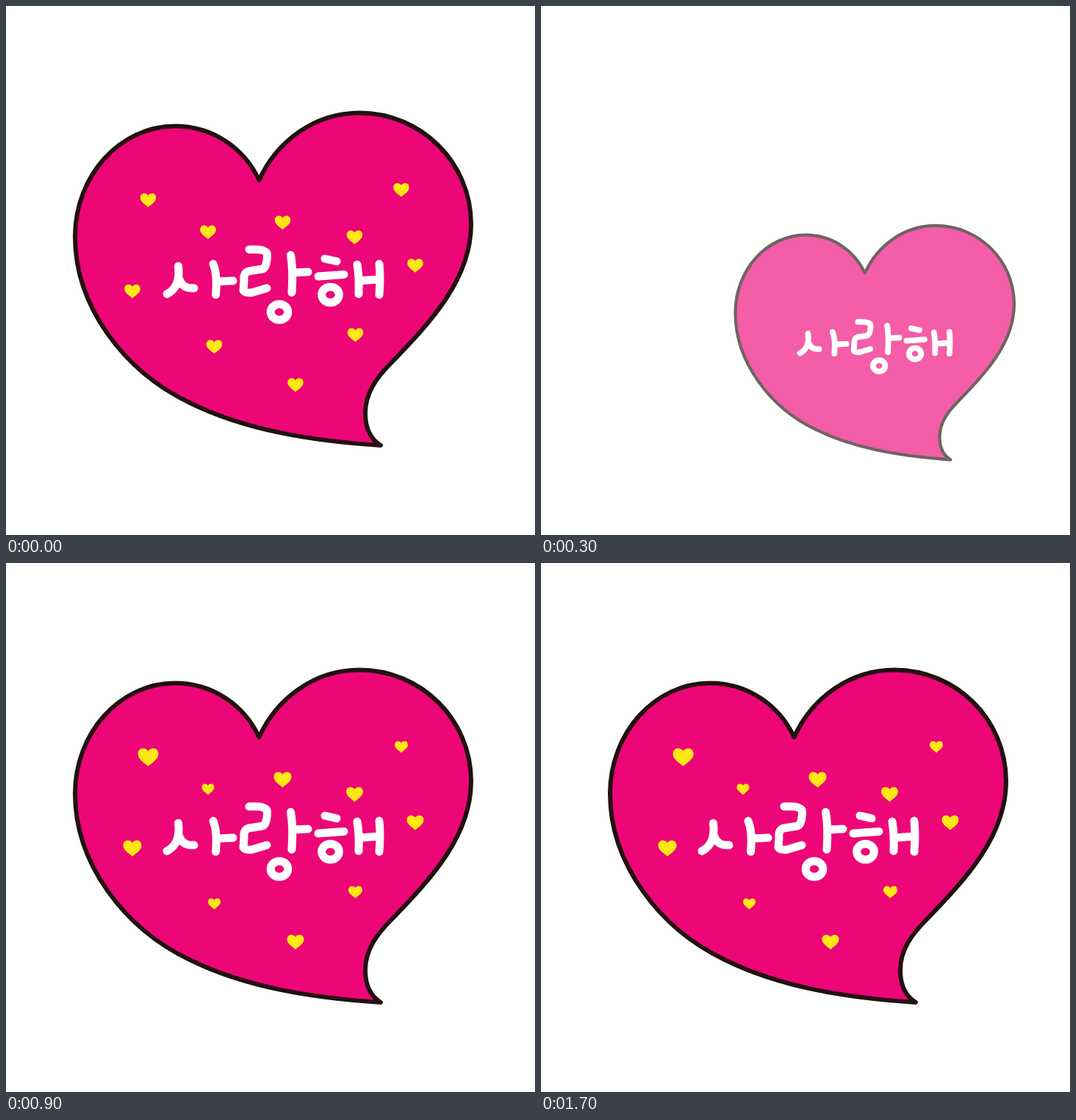
Animation, 720 px wide and 720 px high, one loop 1800 ms. Source, as an HTML page with a canvas:

```html
<!DOCTYPE html>
<html lang="ko">
<head>
<meta charset="utf-8">
<title>사랑해</title>
<style>
  html, body { margin: 0; width: 100%; height: 100%; overflow: hidden; background: #fff; }
  canvas { display: block; width: 720px; height: 720px; }
</style>
</head>
<body>
<canvas id="stage" width="720" height="720" role="img" aria-label="사랑해"></canvas>
<script>
const ctx = document.getElementById('stage').getContext('2d');
const LOOP = 1800, STEP = 100;
const PINK = '#ed0677', INK = '#231010', YELLOW = '#ffe714';
const ANCHOR = { x: 670, y: 664 };

const balloon = new Path2D(`M344.5 237
  C369 183 421 145.5 481 145.5 C565 145.5 633 213 633 297
  C633 372 578 430 525 485 C504 506 489 527 489 554
  C489 575 497 590 510 598 C415 592 325 577 250 540
  C160 497 94 408 94 314 C94 231 155 163.5 230 163.5
  C281 163.5 324 193 344.5 237 Z`);

const lettering = new Path2D(`
  M234.5 354 C237 374 231 386 219 392 M236 372 Q240 385 256 384
  M282 351 Q288 366 285.5 393 M288 375 L309 374
  M331 331.5 Q357 330 355.5 340 Q355 356 349 358 L330 361
  Q323 363 324 374 L323 387 Q325 391 335 390 L355 384
  M387.5 339 Q391 358 389 390 M390 363 L411 362
  M434 344 L450 347.5 M425 368 L460 365.5
  M478 352 Q481 370 480 392 M508 351 Q510 370 508 393 M481 374 L508 372`);
for (const [x, y] of [[372, 416.5], [441.5, 393]]) {
  lettering.moveTo(x + 11.8, y);
  lettering.ellipse(x, y, 11.8, 10.8, 0, 0, Math.PI * 2);
}

const tinyHeart = new Path2D(`M0 -.3 C.05 -.4 .15 -.44 .25 -.44
  C.4 -.44 .5 -.33 .5 -.16 C.5 .12 .15 .28 0 .44
  C-.15 .28 -.5 .12 -.5 -.16 C-.5 -.33 -.4 -.44 -.25 -.44
  C-.15 -.44 -.05 -.4 0 -.3 Z`);

// x, y, width on the alternate beat
const REST_WIDTH = 21.5;
const sparkles = [
  [193.5, 264.5, 28], [275, 308, 17], [376.5, 295, 24], [538, 250.5, 18],
  [474.5, 315, 23], [557, 353.5, 23], [172, 388.5, 25], [283.5, 464, 17],
  [475.5, 448, 19], [394, 516, 23]
];

function drawBalloon(scale) {
  ctx.save();
  ctx.translate(ANCHOR.x, ANCHOR.y);
  ctx.scale(scale, scale);
  ctx.translate(-ANCHOR.x, -ANCHOR.y);
  ctx.lineCap = ctx.lineJoin = 'round';
  ctx.fillStyle = PINK;
  ctx.fill(balloon);
  ctx.strokeStyle = INK;
  ctx.lineWidth = 6;
  ctx.stroke(balloon);
  ctx.strokeStyle = '#fff';
  ctx.lineWidth = 11;
  ctx.stroke(lettering);
  ctx.restore();
}

function drawSparkles(swapped) {
  ctx.fillStyle = YELLOW;
  for (const [x, y, width] of sparkles) {
    const size = swapped ? width : REST_WIDTH;
    ctx.save();
    ctx.translate(x, y);
    ctx.scale(size, size);
    ctx.fill(tinyHeart);
    ctx.restore();
  }
}

function fillStage(alpha) {
  ctx.globalAlpha = alpha;
  ctx.fillStyle = '#fff';
  ctx.fillRect(0, 0, 720, 720);
  ctx.globalAlpha = 1;
}

function draw(time) {
  const beat = Math.floor((time % LOOP) / STEP);
  const entering = beat > 0 && beat < 5;
  const remaining = entering ? 5 - beat : 0;
  fillStage(1);
  drawBalloon(1 - 0.148 * remaining);
  if (entering) fillStage(0.174 * remaining);
  else drawSparkles(beat % 2 === 1);
}

const start = performance.now();
function tick() {
  draw(performance.now() - start);
  requestAnimationFrame(tick);
}
tick();
</script>
</body>
</html>
```
